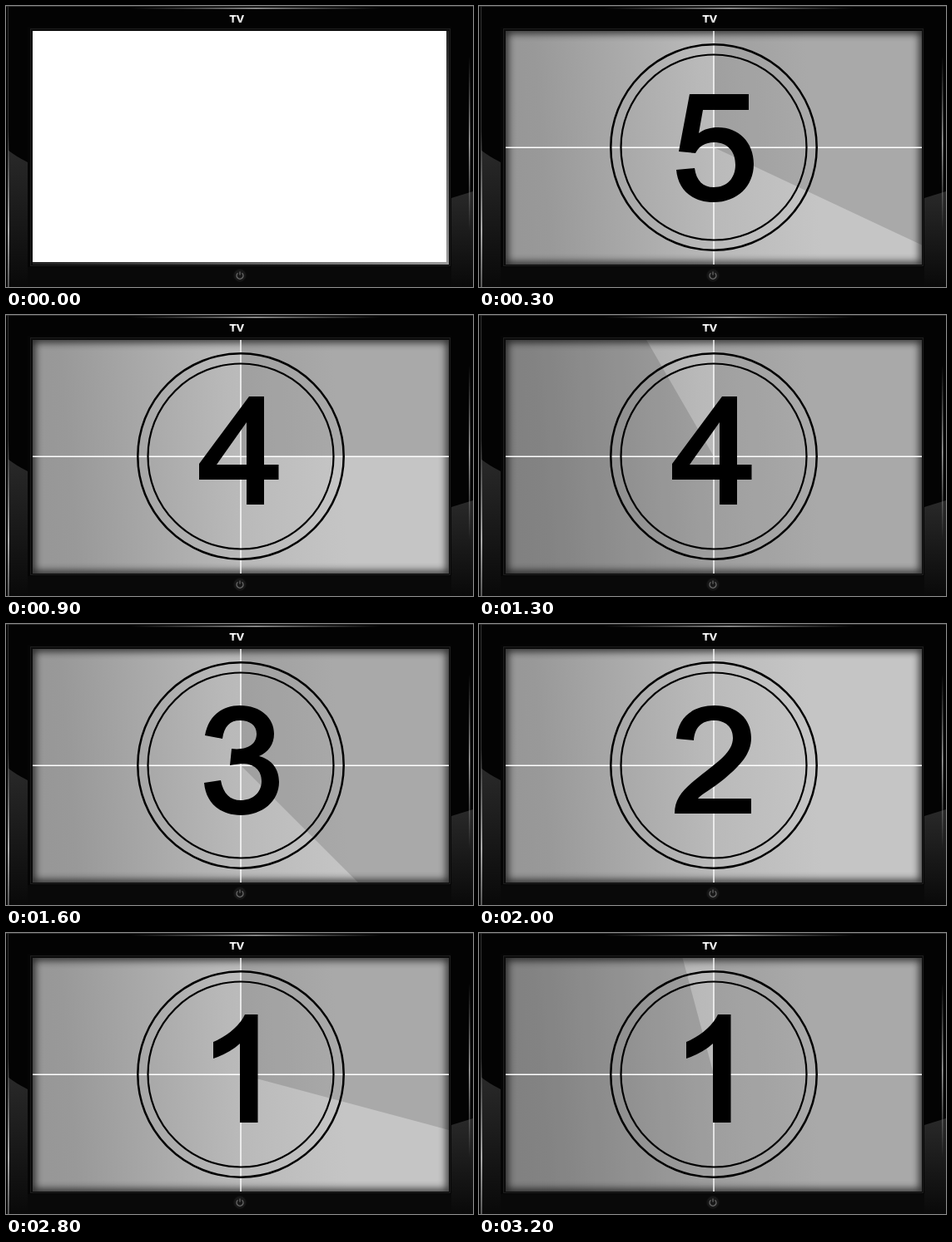
Animation of 561 by 338 pixels, one loop 3300 ms. Source, as an HTML page:

```html
<!DOCTYPE html>
<html lang="en">
<head>
<meta charset="utf-8">
<title>Countdown on a TV</title>
<style>
html, body { margin: 0; width: 100%; height: 100%; overflow: hidden; background: #000; }
svg { display: block; width: 561px; height: 338px; }
text { font: bold 12px "DejaVu Sans", sans-serif; }
</style>
</head>
<body>
<svg viewBox="0 0 561 338">
  <defs>
    <linearGradient id="gray" gradientUnits="userSpaceOnUse" x1="40" y1="170" x2="400" y2="142">
      <stop offset="0" stop-color="#979797"/>
      <stop offset=".1" stop-color="#999"/>
      <stop offset=".64" stop-color="#b9b9b9"/>
      <stop offset="1" stop-color="#c5c5c5"/>
    </linearGradient>
    <linearGradient id="panel" x2="0" y2="1">
      <stop stop-color="#292929"/>
      <stop offset="1" stop-color="#090909"/>
    </linearGradient>
    <linearGradient id="shineX">
      <stop stop-color="#999" stop-opacity="0"/>
      <stop offset=".5" stop-color="#aaa"/>
      <stop offset="1" stop-color="#999" stop-opacity="0"/>
    </linearGradient>
    <linearGradient id="shineY" href="#shineX" x2="0" y2="1"/>
    <linearGradient id="bevelX">
      <stop stop-color="#222"/>
      <stop offset="1" stop-color="#999"/>
    </linearGradient>
    <linearGradient id="bevelY" href="#bevelX" x2="0" y2="1"/>
    <linearGradient id="label" x2="0" y2="1">
      <stop offset=".4" stop-color="#fff"/>
      <stop offset="1" stop-color="#aaa"/>
    </linearGradient>
    <clipPath id="clip"><rect x="32" y="30" width="500" height="281"/></clipPath>
    <filter id="soft" x="-10%" y="-10%" width="120%" height="120%"><feGaussianBlur stdDeviation="5"/></filter>
  </defs>

  <!-- Bezel -->
  <rect width="561" height="338" fill="#030303"/>
  <rect y="312" width="561" height="26" fill="#090909"/>
  <path d="M2 173Q12 181 26 188V338H2Z" fill="url(#panel)"/>
  <path d="M535 231L561 223V338H535Z" fill="url(#panel)"/>
  <rect width="561" height="1" fill="#2a2a2a"/>
  <rect x="150" y="2" width="300" height="1.5" fill="url(#shineX)"/>
  <rect x="2" width="1" height="338" fill="#333"/>
  <rect x="2" y="150" width="2" height="240" fill="url(#shineY)"/>
  <rect x="556" y="60" width="1.5" height="210" fill="url(#shineY)"/>
  <rect x="26" y="25" width="509" height="289" fill="#050505"/>
  <rect x="29.5" y="27.5" width="504" height="285" fill="#0b0b0b" stroke="#1d1d1d"/>
  <text x="268.5" y="20" fill="url(#label)">TV</text>
  <circle cx="281" cy="324" r="7.5" fill="#181818" stroke="#101010"/>
  <path d="M278.5 321.2a4 4 0 1 0 5 0M281 319.5v4" fill="none" stroke="#666" stroke-width="1.3"/>

  <!-- Blank screen -->
  <rect x="529" y="30" width="3" height="281" fill="url(#bevelY)"/>
  <rect x="32" y="308" width="500" height="3" fill="url(#bevelX)"/>
  <rect x="32" y="30" width="497" height="278" fill="#fff"/>

  <!-- Film leader -->
  <g id="film" clip-path="url(#clip)" fill="none" visibility="hidden">
    <rect x="32" y="30" width="500" height="281" fill="url(#gray)"/>
    <circle id="sweep" cx="282" cy="170" r="150" pathLength="360" stroke="#000" stroke-opacity=".145"
      stroke-width="300" transform="rotate(-90 282 170)"/>
    <rect x="30" y="28" width="504" height="285" stroke="#000" stroke-width="10" opacity=".75" filter="url(#soft)"/>
    <path d="M282 30V311M32 170.3H532" stroke="#fff" stroke-width="1.4"/>
    <circle cx="282" cy="170" r="123.7" stroke="#000" stroke-width="2.5"/>
    <circle cx="282" cy="170" r="111.5" stroke="#000" stroke-width="2.2"/>
    <path id="digit" fill="#000" fill-rule="evenodd"/>
  </g>
</svg>
<script>
const digits = [
  // 5, 4, 3, 2, 1
  "M253 106H324V125H269L264 153C271 148 278 146 287 146C312 146 330 164 330 190C330 217 310 236 282 236C256 236 239 221 237 197L259 195C261 210 269 218 282 218C298 218 308 207 308 191C308 174 298 164 282 164C272 164 264 169 260 177L240 175Z",
  "M292 98H310V180H327.5V198H310V228H289V198H232V179ZM289 180V129L253 180Z",
  "M239 134C243 111 259 98 281 98C306 98 322 113 322 132C322 145 315 154 304 159C319 163 328 174 328 190C328 213 308 230 282 230C257 230 240 215 238 191L258 188C261 204 269 212 282 212C296 212 307 203 307 189C307 176 298 168 284 168C280 168 275 169 269 170L271 150C288 152 301 146 301 132C301 122 293 116 281 116C269 116 262 123 260 138Z",
  "M237 138C239 112 257 98 283 98C310 98 327 114 327 137C327 156 314 170 295 186C279 199 268 204 263 210H327V228H235C235 210 245 199 264 184C288 165 305 154 305 137C305 124 296 116 282 116C267 116 259 125 258 140Z",
  "M302.5 98V228H281V133C272 141 261 147 249 151V131C266 124 281 111 287 98Z"
];
const [film, sweep, digit] = ["film", "sweep", "digit"].map(id => document.getElementById(id));

function draw(now) {
  const step = Math.floor(now / 100) % 33;
  film.setAttribute("visibility", step ? "visible" : "hidden");
  if (step) {
    // Four film frames per step; the first turn has one extra frame.
    const k = 4 * (step - 1);
    const turn = k < 26 ? 0 : Math.floor((k - 1) / 25);
    const angle = turn ? (k - 1) % 25 * 15 : k * 14.4;
    digit.setAttribute("d", digits[turn]);
    sweep.setAttribute("stroke-dasharray", `${angle} 720`);
  }
  requestAnimationFrame(draw);
}
requestAnimationFrame(draw);
</script>
</body>
</html>
```
